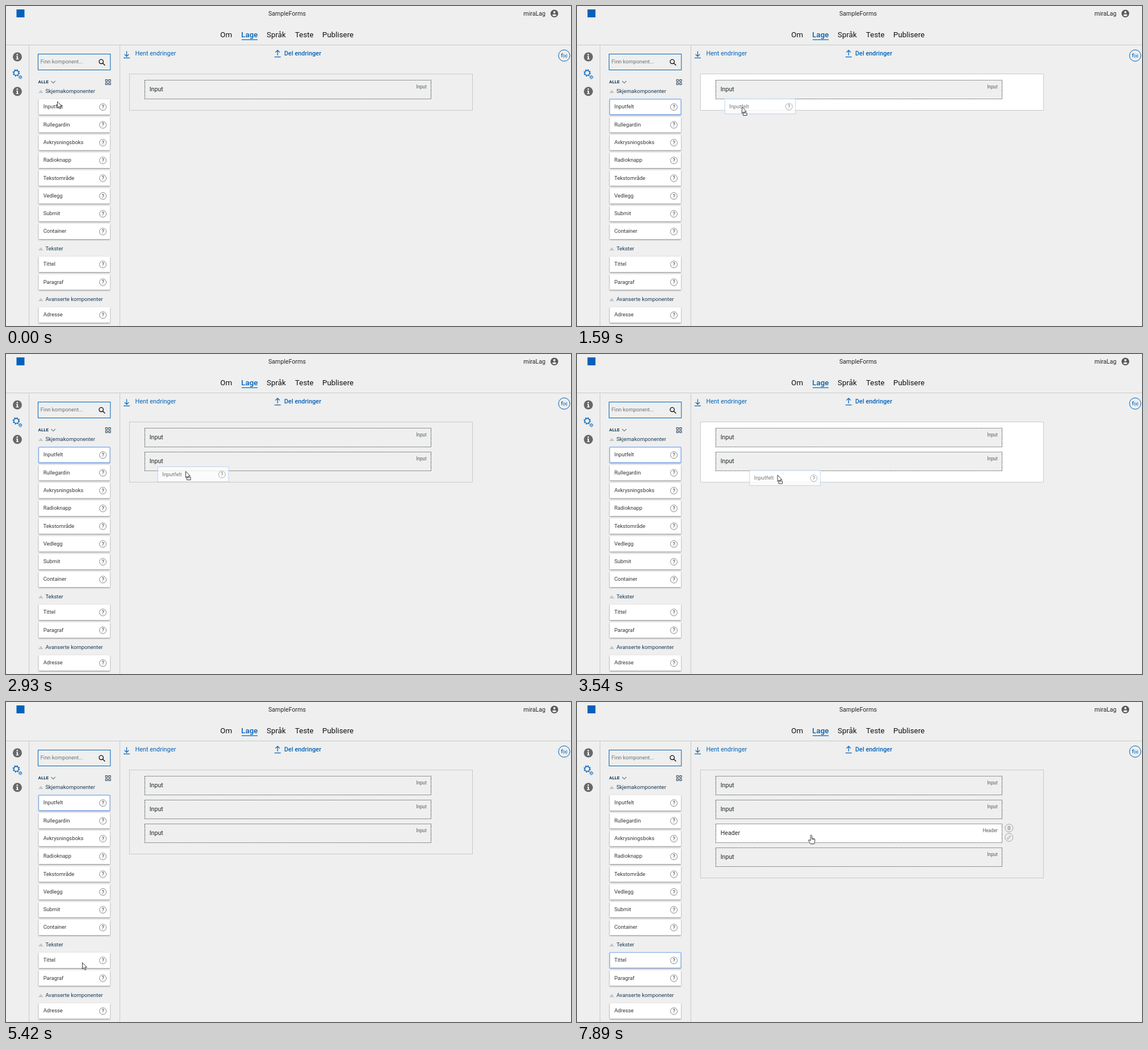
An HTML page that plays this animation: 995 by 563 pixels, repeating every 8000 ms.

```html
<!DOCTYPE html>
<html lang="no">
<head>
<meta charset="utf-8">
<title>Skjemabygger</title>
<style>
html, body { margin: 0; width: 100%; height: 100%; overflow: hidden; background: #eeefee; }
svg { display: block; width: 100vw; height: 100vh; font-family: Roboto, sans-serif; }
text { fill: #323638; font-size: 9.4px; white-space: pre; }
.nav { font-size: 13.33px; fill: #111; }
.mid { font-size: 10.67px; fill: #24282c; }
.link { font-size: 10.9px; }
.tag { font-size: 8.2px; fill: #5a5d5f; text-anchor: end; }
.head { fill: #1c3a57; font-size: 9.5px; }
.bold { font-weight: 500; }
.blue { fill: #0062ba; }
.line { fill: none; stroke: #c8caca; }
.bline { fill: none; stroke: #0062ba; stroke-width: 1.2; }
.gline { fill: none; stroke: #66696b; stroke-width: .8; }
.card { fill: #fff; filter: drop-shadow(0 1px 1px #0007); }
.focus { fill: none; stroke: #74a4f0; stroke-width: 1.1; }
.dots { stroke: #3a3d3f; stroke-width: 1.2; stroke-dasharray: 1.33; }
.pointer { fill: #fff; stroke: #20242c; stroke-width: .9; stroke-linejoin: round; }
</style>
</head>
<body>
<svg viewBox="0 0 995 563">
  <rect width="995" height="563" fill="#eeefee"/>
  <rect x="18.5" y="6" width="14" height="14" fill="#0062ba"/>
  <text class="mid" x="495" y="16.7" text-anchor="middle">SampleForms</text>
  <text class="mid" x="950" y="16.7" text-anchor="end">miraLag</text>
  <g transform="translate(965.7 13.3)">
    <circle r="6.7" fill="#565859"/>
    <circle cy="-2.3" r="2.1" fill="#eeefee"/>
    <path d="M-4 2.7C-3 .6 3 .6 4 2.7Q2.4 4.8 0 4.8T-4 2.7z" fill="#eeefee"/>
  </g>

  <text class="nav" x="377.3" y="54.7">Om</text>
  <text class="nav blue bold" x="414.3" y="54.7">Lage</text>
  <text class="nav" x="459" y="54.7">Språk</text>
  <text class="nav" x="509" y="54.7">Teste</text>
  <text class="nav" x="557" y="54.7">Publisere</text>
  <path class="bline" d="M415 59.3h28"/>
  <path class="line" d="M0 68.5h995M40.5 68.5V563M200.5 68.5V563"/>

  <g id="rail"></g>
  <g fill="none" stroke="#0062ba">
    <circle cx="18" cy="117.7" r="4.2" stroke-width="1.4"/>
    <circle cx="18" cy="117.7" r="5.6" stroke-width="1.4" stroke-dasharray="2.2 2.2"/>
    <circle cx="25.2" cy="125.2" r="1.8"/>
    <circle cx="25.2" cy="125.2" r="2.9" stroke-dasharray="1.15 1.13"/>
  </g>

  <rect x="56.5" y="84.5" width="127.3" height="28" class="bline" style="stroke-width:1"/>
  <text x="60.7" y="101.2" style="fill:#707376">Finn komponent...</text>
  <g fill="none" stroke="#15181a" stroke-width="1.4"><circle cx="167.7" cy="97.8" r="3.7"/><path d="M170.4 100.5l4 4"/></g>
  <text class="head" x="56.5" y="136.3" style="font-size:8px;font-weight:700">ALLE</text>
  <path d="M79.5 132l3.7 3.7 3.7-3.7" fill="none" stroke="#0b2c4c"/>
  <path d="M175.3 129.5h3.4v3.4h-3.4zM180.8 129.5h3.4v3.4h-3.4zM175.3 135h3.4v3.4h-3.4zM180.8 135h3.4v3.4h-3.4z" fill="none" stroke="#0b2c4c" stroke-width=".9"/>
  <g id="menu"></g>
  <rect id="focus" class="focus" x="57.6" width="125.4" height="27.2" rx="1"/>

  <path class="bline" d="M212.5 79.5v9M208.8 85l3.7 3.7 3.7-3.7M207 91.3h11"/>
  <text class="link blue" x="227.5" y="86.8">Hent endringer</text>
  <path class="bline" d="M478.3 87v-9M474.6 81.5l3.7-3.7 3.7 3.7M472.8 89.7h11"/>
  <text class="link blue bold" x="490" y="86.8">Del endringer</text>
  <circle class="bline" cx="983" cy="87.2" r="10" style="stroke-width:1"/>
  <text class="blue bold" x="977.3" y="90">f<tspan font-size="6.5">(x)</tspan></text>

  <rect id="area" class="line" x="217.5" y="119.5" width="604"/>
  <g id="items"></g>
  <g id="tools" opacity=".7">
    <circle class="gline" r="7"/><circle class="gline" cy="16.5" r="7"/>
    <path class="gline" d="M-2.7-2.2h5.4M-1-2.4v-1h2v1M-2-2l.3 5.2h3.4L2-2M-.6-.7v2.6M.6-.7v2.6"/>
    <path class="gline" d="M-3 19.5l.5-2.1 4-4 1.6 1.6-4 4z"/>
  </g>

  <g id="ghost">
    <rect width="124.5" height="26.5" fill="#fff" fill-opacity=".78" stroke="#b9d0f5" stroke-width=".9"/>
    <g opacity=".68"><text id="ghostText" x="7.8" y="16.4"></text><g id="ghostHelp"></g></g>
  </g>
  <g id="cursor">
    <g id="arrow">
      <path class="pointer" d="M0 0V11.3L2.6 8.9 4.5 13 6.3 12.2 4.5 8.3H7.9z"/>
      <rect id="badge" class="pointer" x="2.2" y="10.6" width="6.4" height="4.4"/>
    </g>
    <g id="hand">
      <path class="pointer" d="M-1.3 1.3C-1.3-.4 1.2-.4 1.2 1.3V5.8L5 6.6Q6.8 7 6.6 9L6 12.4 5.2 15.6H-1.4L-4.8 10Q-5.1 8.2-3.4 8.6L-1.3 10.4z"/>
      <path d="M1.2 5.8v2.6M3.1 6.2v2.2M4.9 6.7v2" stroke="#20242c" stroke-width=".8"/>
    </g>
  </g>
</svg>
<script>
const $ = id => document.getElementById(id);
const LOOP = 8000;
const help = (x, y) => `<circle class="gline" cx="${x}" cy="${y}" r="6"/>
  <text x="${x}" y="${y + 3.3}" text-anchor="middle">?</text>`;

const card = (name, y) => `<rect class="card" x="57.6" y="${y}" width="125.4" height="27.2"/>
  <text x="65.7" y="${y + 16.4}">${name}</text>${help(170.6, y + 13.9)}`;

const group = (title, mid, names) => `<path d="M57 ${mid + 3.2}h8.6l-4.3-5.4z" fill="#c3c5c5"/>
  <text class="head" x="69.4" y="${mid + 3.3}">${title}</text>` +
  names.map((name, i) => card(name, mid + 14 + i * 31.3)).join('');

$('menu').innerHTML =
  group('Skjemakomponenter', 149.9, ['Inputfelt', 'Rullegardin', 'Avkrysningsboks', 'Radioknapp',
    'Tekstområde', 'Vedlegg', 'Submit', 'Container']) +
  group('Tekster', 426.8, ['Tittel', 'Paragraf']) +
  group('Avanserte komponenter', 516, ['Adresse']);

$('rail').innerHTML = [89.5, 150.3].map(y => `<circle cx="20" cy="${y}" r="8" fill="#666869"/>
  <path d="M18 ${y - 1.3}h3v4.5h1.3v1.3h-4.6v-1.3h1.3v-3.2h-1zM18.6 ${y - 5}h2.4v2.3h-2.4z" fill="#fff"/>`).join('');
$('ghostHelp').innerHTML = help(113, 13.7);

// Pointer legs: first step, last step, number of steps, end point
const legs = [
  [430, 1380, 7, 284, 182], [1590, 1590, 1, 290, 177],
  [1850, 2310, 4, 119, 178], [2470, 2620, 2, 267, 192],
  [2770, 2930, 2, 316, 206], [3080, 3700, 5, 372, 216], [3850, 3850, 1, 371, 215],
  [4310, 5270, 7, 134, 458], [5570, 5570, 1, 121, 454],
  [5730, 6340, 5, 408, 240], [6500, 6650, 2, 414.5, 234],
  [6810, 6810, 1, 416, 234], [7420, 7610, 2, 407, 241], [7890, 7890, 1, 412, 233.5]
];
// Drags: pick-up, drop, label, grab offset
const drags = [
  [590, 1690, 'Inputfelt', 30, 14],
  [2470, 3850, 'Inputfelt', 49, 8],
  [5730, 6810, 'Tittel', 63.5, 12]
];

const ease = k => (1 - Math.cos(Math.PI * k)) / 2;

function pointer(t) {
  let x = 90, y = 167.5;
  for (const [start, end, steps, tx, ty] of legs) {
    if (t < start) break;
    const gap = (end - start) / (steps - 1 || 1) || 1;
    const k = ease(Math.min(steps, Math.floor((t - start) / gap + 1.01)) / steps);
    x += (tx - x) * k;
    y += (ty - y) * k;
  }
  return [x, y];
}

const itemTop = i => 130.5 + 42 * i;
const item = (name, i, hot) => {
  const y = itemTop(i);
  return `<rect class="dots" x="244.5" y="${y}" width="504" height="33" fill="${hot ? '#fff' : '#eeefee'}"/>
    <text class="mid" x="252.7" y="${y + 19.2}">${name}</text>
    <text class="tag" x="740.8" y="${y + 14}">${name}</text>`;
};

const show = (id, on) => $(id).style.display = on ? '' : 'none';
const place = (id, x, y) => $(id).setAttribute('transform', `translate(${x} ${y})`);
let lastItems = '';

function draw(t) {
  const [x, y] = pointer(t);
  const drag = drags.find(d => t >= d[0] && t < d[1]);
  const names = ['Input'];
  if (t >= 1690) names.push('Input');
  if (t >= 3850) names.push('Input');
  if (t >= 6810) names.splice(2, 0, 'Header');

  const over = x < 244 || x > 749 ? -1
    : names.findIndex((_, i) => y >= itemTop(i) - .5 && y <= itemTop(i) + 33.5);
  const hover = drag ? -1 : over;
  const height = 22 + 42 * names.length;
  const inArea = x > 217 && x < 822 && y > 119 && y < 120 + height;

  $('area').setAttribute('height', height);
  $('area').style.fill = drag && inArea && over < 0 ? '#fff' : 'none';
  const html = names.map((name, i) => item(name, i, i === hover)).join('');
  if (html !== lastItems) $('items').innerHTML = lastItems = html;

  show('tools', hover >= 0);
  place('tools', 760.8, itemTop(hover) + 7.3);
  show('focus', t >= 430);
  $('focus').setAttribute('y', t < 5570 ? 163.9 : 440.8);

  show('ghost', drag);
  if (drag) {
    $('ghostText').textContent = drag[2];
    place('ghost', x - drag[3] + .3, y - drag[4] + .3);
  }
  place('cursor', x + .5, y + .5);
  show('hand', hover >= 0);
  show('arrow', hover < 0);
  show('badge', drag);
}

const begin = performance.now();
function tick() {
  draw((performance.now() - begin) % LOOP);
  requestAnimationFrame(tick);
}
tick();
</script>
</body>
</html>
```
